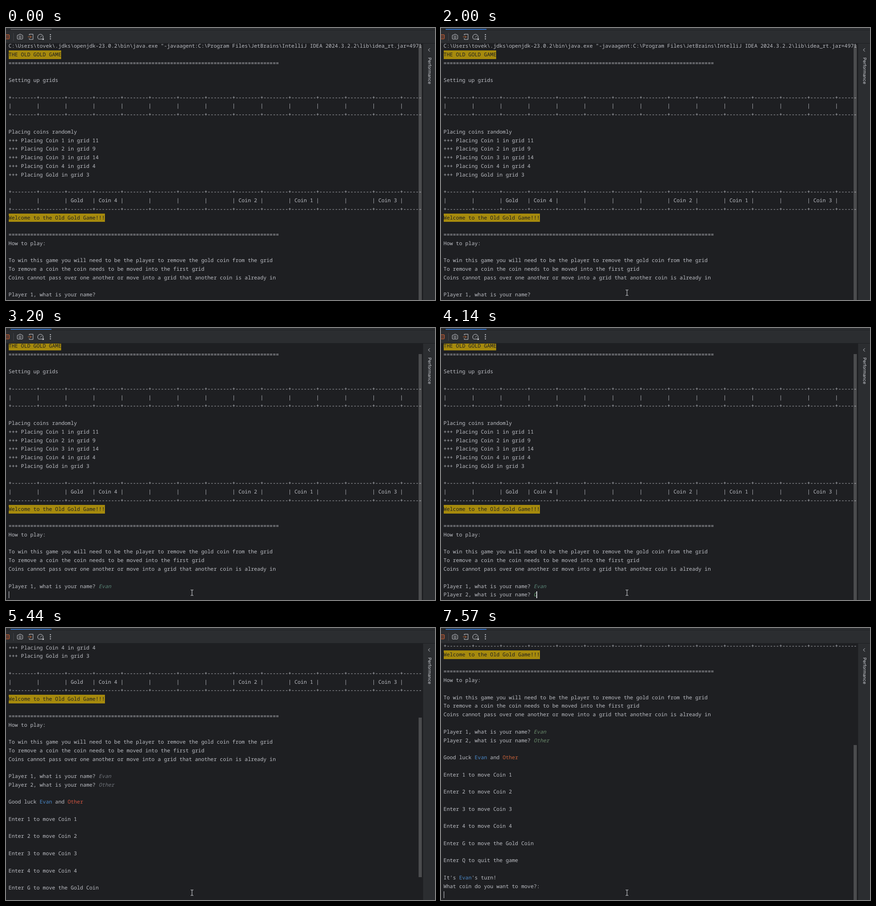
An HTML page that plays this animation: 941 by 595 pixels, repeating every 8 s.

```html
<!DOCTYPE html>
<html lang="en">
<head>
<meta charset="utf-8">
<title>Console game</title>
<style>
html, body { margin: 0; width: 100%; height: 100%; overflow: hidden; background: #1e1f22; }
body, body > * { position: absolute; }
#bar { left: 0; top: 0; width: 941px; height: 33px; background: #2b2d30; }
#side { left: 915px; top: 34px; width: 26px; height: 561px; background: #2b2d30; }
#tab { left: 10px; top: 2px; width: 90px; height: 2px; border-radius: 1px; }
#line { left: 0; top: 4px; width: 941px; height: 1px; background: #1e1f22; }
#view { left: 0; top: 34px; width: 912px; height: 561px; overflow: hidden; }
pre {
  position: absolute; left: 5.6px; margin: 0; color: #bcbec4;
  font: 11.363px/18.766px "Noto Sans Mono", "DejaVu Sans Mono", monospace;
  text-rendering: geometricPrecision; font-variant-ligatures: none;
}
mark { background: #a68a0d; color: #1e1f22; padding: 1.85px 0; }
i { color: var(--input); }
#thumb { left: 905px; width: 7px; background: rgba(255, 255, 255, .2); }
#caret { top: 576px; height: 15px; background: #ced0d6; }
svg { left: 0; top: 0; }
</style>
</head>
<body>
<div id="bar"></div>
<div id="side"></div>
<div id="line"></div>
<div id="tab"></div>
<div id="view"><pre id="log"></pre></div>
<div id="thumb"></div>
<div id="caret"></div>
<svg width="941" height="595" fill="none" stroke="#ced0d6">
  <rect x="-4" y="14.5" width="11.5" height="9.5" rx="1.5" fill="#5a3a30" stroke="#c9602f"/>
  <path d="M16.5 11V28" stroke="#43454a"/>
  <path d="M26 15.5H28L29 13.8H33L34 15.5H35.5Q36.7 15.5 36.7 16.7V23Q36.7 24.2 35.5 24.2H26Q24.8 24.2 24.8 23V16.7Q24.8 15.5 26 15.5Z"/>
  <circle cx="30.8" cy="19.7" r="2.3"/>
  <path d="M51 16V13.5H59.3V25H51V22.5"/>
  <path d="M48 19.3H55.5M53 16.6L55.7 19.3L53 22" stroke="#c9703f"/>
  <path d="M71.5 24.2A6 6 0 1 1 79.5 24.2ZM75 20.5L78.5 17"/>
  <path d="M83 22V26H79Z" fill="#ced0d6" stroke="none"/>
  <g fill="#ced0d6" stroke="none">
    <circle cx="97.4" cy="14.7" r="1.2"/><circle cx="97.4" cy="19.2" r="1.2"/><circle cx="97.4" cy="23.7" r="1.2"/>
    <text transform="translate(925.5 64.5) rotate(90)" font-family="Inter, sans-serif" font-size="9.5" text-rendering="geometricPrecision">Performance</text>
  </g>
  <path d="M929.8 44.5L926.3 48L929.8 51.5"/>
  <path id="mouse" d="M-3 -6H-1Q0 -6 0 -5Q0 -6 1 -6H3M0 -5V5M-3 6H-1Q0 6 0 5Q0 6 1 6H3" stroke="#dfe1e5"/>
</svg>
<script>
const $ = id => document.getElementById(id);
const LOOP = 8000, ROW = 18.766, COL = 6.818, LEFT = 5.6, TOP = -2.9;
const PLAYER = "Evan", RIVAL = "Other";
const ENTER1 = 3200, ASK2 = 3420, ENTER2 = 5440, SETTLED = 5540;

const edge = "+" + "--------+".repeat(16);
const rule = "=".repeat(87);
const grid = items => "|" + Array.from({ length: 16 }, (_, n) =>
  (" " + (items[n + 1] || "")).padEnd(8) + "|").join("");
const paint = (text, color) => `<span style="color:${color}">${text}</span>`;
const ask = n => `Player ${n}, what is your name? `;

const intro = [
  'C:\\Users\\tovek\\.jdks\\openjdk-23.0.2\\bin\\java.exe "-javaagent:C:\\Program Files\\JetBrains\\IntelliJ IDEA 2024.3.2.2\\lib\\idea_rt.jar=4971',
  "<mark>THE OLD GOLD GAME</mark>", rule, "",
  "Setting up grids", "", edge, grid({}), edge, "",
  "Placing coins randomly",
  ...[11, 9, 14, 4].map((cell, n) => `+++ Placing Coin ${n + 1} in grid ${cell}`),
  "+++ Placing Gold in grid 3", "",
  edge, grid({ 3: "Gold", 4: "Coin 4", 9: "Coin 2", 11: "Coin 1", 14: "Coin 3" }), edge,
  "<mark>Welcome to the Old Gold Game!!!</mark>", "", rule,
  "How to play:", "",
  "To win this game you will need to be the player to remove the gold coin from the grid",
  "To remove a coin the coin needs to be moved into the first grid",
  "Coins cannot pass over one another or move into a grid that another coin is already in", ""
];

const typed = (name, times, t) => name.slice(0, times.filter(at => at <= t).length);

function outro(t) {
  const blue = paint(PLAYER, "#4a88c7");
  const red = paint(RIVAL, t < SETTLED ? "#d25440" : "#c8623a");
  const moves = ["1 to move Coin 1", "2 to move Coin 2", "3 to move Coin 3", "4 to move Coin 4",
    "G to move the Gold Coin", "Q to quit the game"];
  return ["", `Good luck ${blue} and ${red}`, "",
    ...moves.flatMap(move => ["Enter " + move, ""]),
    `It's ${blue}'s turn!`, "What coin do you want to move?:", ""];
}

function mousePos(t) {
  if (t < 180) return [-50, -50];
  if (t >= 1100) return [408, 579];
  if (t >= 1000) return [409, 578];
  if (t >= 900) return [412, 573];
  const p = Math.floor((t - 180) / 103) / 6;
  const left = (1 - Math.min(p, 1)) ** 2;
  return [406 + 300 * left, 569 + 20 * left];
}

function caretShown(t) {
  if (t >= SETTLED) return !(t >= 6060 && t < 6550 || t >= 7050 && t < 7570);
  return t >= 1100 && t < ENTER2 && !(t >= 2000 && t < 2200) && !(t >= 4020 && t < 4140);
}

let shown = "";
function draw(t) {
  const first = typed(PLAYER, [2200, 2400, 2700, 2800], t);
  const second = typed(RIVAL, [4140, 4640, 4740, 5040, 5240], t);
  const done = t < ENTER2 ? "#5a8577" : t < SETTLED ? "#6f737a" : "#6a8a6c";
  const live = t < ENTER2 ? "#6aab73" : done;
  const answer = (text, color) => `<i style="--input:${color}">${text}</i>`;

  const lines = [...intro, ask(1) + answer(first, t < ENTER1 ? live : done)];
  if (t >= ASK2) lines.push(ask(2) + answer(second, live));
  if (t >= ENTER2) lines.push(...outro(t));
  const html = lines.join("\n");
  if (html !== shown) $("log").innerHTML = shown = html;

  const [scroll, top, bottom] =
    t < ENTER1 ? [0, 37, 595] :
    t < ENTER2 ? [ROW, 57, 595] :
    t < SETTLED ? [259.2, 196, 545] : [19 * ROW, 256, 595];
  $("log").style.top = TOP - scroll + "px";
  $("thumb").style.top = top + "px";
  $("thumb").style.height = bottom - top + "px";
  $("tab").style.background = t < 1100 ? "#5e6064" : "#3574c9";

  const col = t < ENTER1 ? ask(1).length + first.length :
    t >= ASK2 && t < ENTER2 ? ask(2).length + second.length : 0;
  const caret = $("caret").style;
  caret.display = caretShown(t) ? "block" : "none";
  caret.left = Math.round(LEFT + col * COL) - (col ? 1 : 0) + "px";
  caret.width = (col ? 2 : 1) + "px";

  $("mouse").setAttribute("transform", `translate(${mousePos(t)})`);
}

const start = performance.now();
function tick() {
  draw((performance.now() - start) % LOOP);
  requestAnimationFrame(tick);
}
tick();
</script>
</body>
</html>
```
